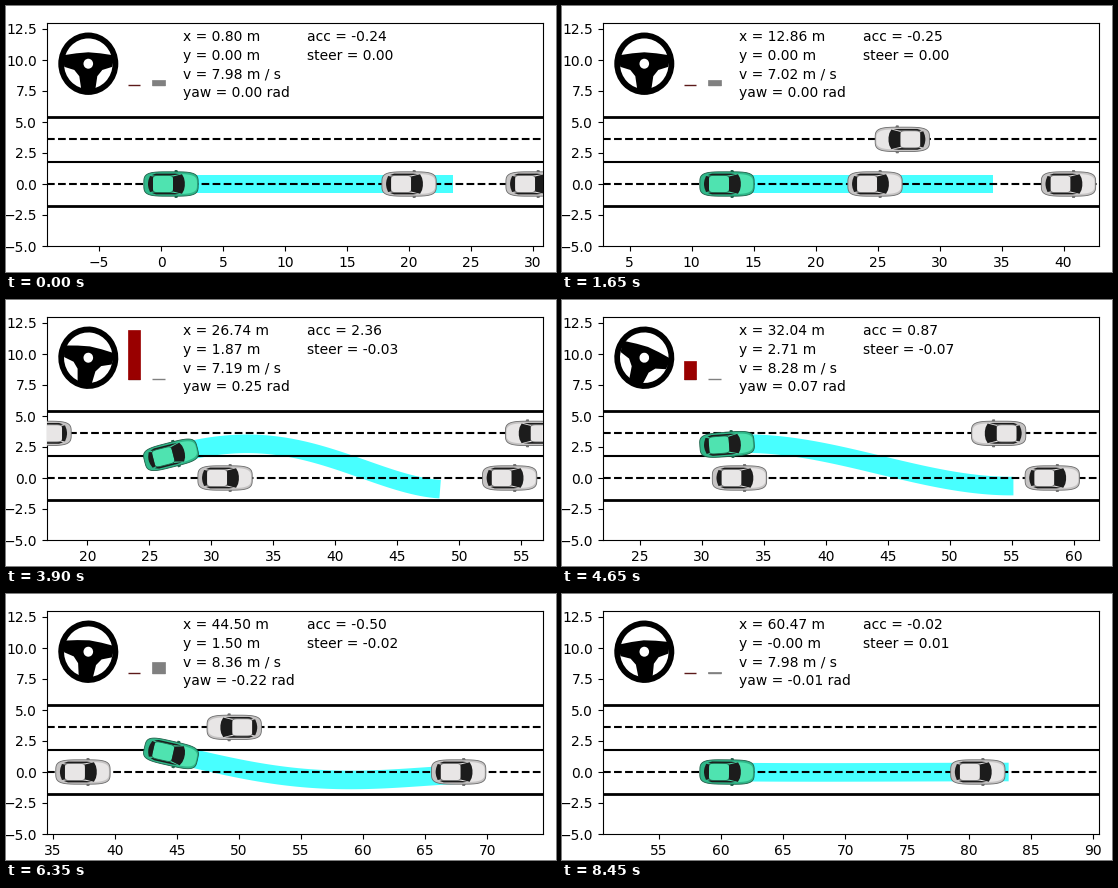
Recreate the animation shown at these times as a matplotlib script. Size 550 by 266 pixels, loop 9450 ms.

```python
import numpy as np
import matplotlib.pyplot as plt
from matplotlib.animation import FuncAnimation
from matplotlib.patches import Circle, Polygon, Rectangle
from matplotlib.ticker import MultipleLocator
from matplotlib.transforms import Affine2D

W, H, DPI = 550, 266, 100
SCALE = 12.4          # pixels per metre
INTERVAL, LOOP = 50, 9450
DT = 0.1              # simulated seconds per step

# A step takes 100 ms; playback hangs for 50 ms more after each run of steps
RUNS = [3, 5, 8, 9, 8, 6, 5, 6, 4, 4, 14, 4, 3]
STEP_TIMES = 50 + 100 * np.arange(sum(RUNS)) + 50 * np.repeat(np.arange(len(RUNS)), RUNS)

# Key states of the overtaking: step, x, y, v, acc, yaw, steer
KEYS = np.array([
    (0, 0.80, 0, 7.976, -0.24, 0, 0),
    (16, 12.86, 0, 7.02, -0.25, 0, 0),
    (27, 20.21, 0.51, 6.54, -0.002, 0.12, 0.05),
    (37, 26.74, 1.87, 7.19, 2.36, 0.25, -0.03),
    (51, 37.90, 2.66, 8.58, 0.10, -0.09, -0.11),
    (68, 51.67, 0.18, 8.02, -0.05, -0.09, 0.08),
    (79, 60.47, -0.001, 7.98, -0.02, -0.01, 0.01)]).T
# Far end of the planned path: step, y, slope, bulge of the middle
PLAN = np.array([
    (16, 0, 0, 0),
    (27, 2.1, -0.15, 0.77),
    (37, -0.9, -0.06, 0.83),
    (51, -0.4, 0.08, -0.79),
    (68, 0, 0, 0)]).T
# Traffic: start x, lane y, speed
TRAFFIC = [(20, 0, 3.0), (30, 0, 6.5), (35, 3.6, -5.0), (67, 3.6, -3.0)]


def cubic(u, h, a, b, p, q):
    """Cubic over a span h from a to b with end slopes p, q; returns value and slope."""
    p, q = p * h, q * h
    c2, c3 = 3 * (b - a) - 2 * p - q, 2 * (a - b) + p + q
    return a + u * (p + u * (c2 + u * c3)), (p + u * (2 * c2 + 3 * u * c3)) / h


def ego_state(step):
    k, xs, ys, vs, accs, yaws, steers = KEYS
    i = min(np.searchsorted(k, step, "right") - 1, len(k) - 2)
    h = k[i + 1] - k[i]
    u = (step - k[i]) / h

    def ease(values, rates):
        return cubic(u, h, *values[i:i + 2], *(rates[i:i + 2] * DT))

    x, dx = ease(xs, vs * np.cos(yaws))
    y, dy = ease(ys, vs * np.sin(yaws))
    v, dv = ease(vs, accs)
    return x, y, v, dv / DT, np.arctan2(dy, dx), np.interp(step, k, steers)


def plan_outline(step, x, y, v, yaw, half=0.75):
    end, slope, bulge = [np.interp(step, PLAN[0], row) for row in PLAN[1:]]
    length = 12.5 + 1.28 * v
    u = np.linspace(0, 1, 60)
    mid, _ = cubic(u, length, y, end, np.tan(yaw), slope)
    mid += bulge * 16 * (u * (1 - u)) ** 2
    angle = np.arctan(np.gradient(mid, u * length))
    side = half * np.column_stack([-np.sin(angle), np.cos(angle)])
    centre = np.column_stack([x + u * length, mid])
    return np.vstack([centre + side, (centre - side)[::-1]])


def rounded(cx, rx, ry, power=0.45):
    a = np.linspace(0, 2 * np.pi, 60, endpoint=False)
    c, s = np.cos(a), np.sin(a)
    return np.column_stack([cx + rx * np.sign(c) * abs(c) ** power,
                            ry * np.sign(s) * abs(s) ** power])


def mirrored(points):
    return points + [(x, -y) for x, y in reversed(points)]


class Car:
    """Top view of a car, drawn in pixels around its centre."""

    def __init__(self, ax, body, roof, edge, zorder):
        glass = "#1c1c1c"
        shapes = [([(4, 11 * s), (7, 11 * s), (6, 13.5 * s), (4, 13.5 * s)], edge, edge)
                  for s in (1, -1)]
        shapes.append((rounded(0, 27.2, 12.2, 0.5), body, edge))
        shapes.append((rounded(2, 24, 10, 0.55), roof, "none"))
        for s in (1, -1):
            shapes.append(([(-19, 9 * s), (-15, 10.4 * s), (4, 10.4 * s), (9, 9.8 * s),
                            (2, 8.7 * s), (-16, 8.2 * s)], glass, "none"))
        shapes.append((rounded(-8, 10.5, 8.6, 0.35), roof, edge))
        shapes.append((mirrored([(2, 7.5), (11, 9.8), (13, 6), (13.8, 2)]), glass, "none"))
        shapes.append((mirrored([(-18, 7.5), (-21, 8), (-22.5, 4), (-23, 1)]), glass, "none"))
        self.ax = ax
        self.parts = [ax.add_patch(Polygon(p, fc=fc, ec=ec, lw=0.6, zorder=zorder))
                      for p, fc, ec in shapes]

    def place(self, x, y, angle):
        pose = Affine2D().scale(1 / SCALE).rotate(angle).translate(x, y)
        for part in self.parts:
            part.set_transform(pose + self.ax.transData)


fig = plt.figure(figsize=(W / DPI, H / DPI), dpi=DPI, facecolor="white")
box = [41 / W, 26 / H, 496 / W, 223.2 / H]
ax = fig.add_axes(box)
ax.set_ylim(-5, 13)
ax.xaxis.set_major_locator(MultipleLocator(5))
ax.yaxis.set_major_locator(MultipleLocator(2.5))

# The dashboard keeps its place relative to the ego car
hud = fig.add_axes(box)
hud.set(xlim=(-10, 30), ylim=(-5, 13))
hud.axis("off")

for lane_y, width, style in ((5.4, 2, "-"), (3.6, 1.5, "--"), (1.8, 1.5, "-"),
                             (0, 1.5, "--"), (-1.8, 2, "-")):
    ax.axhline(lane_y, color="black", lw=width, ls=style, zorder=2)

plan = ax.add_patch(Polygon([(0, 0), (1, 0), (1, 1)], fc="#48ffff", ec="none", zorder=1))
traffic = [Car(ax, "#c6c4c4", "#e8e6e6", "#6a6a6a", 3) for _ in TRAFFIC]
ego = Car(ax, "#30b88a", "#4fe3b0", "#1d5f48", 4)

spokes = [(0, 11), (12, 10), (26, 8), (24, -3), (14, -6), (9, -12), (7, -25)]
spokes += [(-x, y) for x, y in reversed(spokes)]
wheel = [hud.add_patch(p) for p in (
    Circle((0, 0), 30, fc="black", zorder=1), Circle((0, 0), 24.3, fc="white", zorder=2),
    Polygon(spokes, fc="black", zorder=3), Circle((0, 0), 4.8, fc="white", zorder=4))]


def pedal(x, color, idle):
    hud.plot([x, x + 1], [8, 8], color=idle, lw=1, solid_capstyle="butt")
    return hud.add_patch(Rectangle((x, 8), 1, 0, fc=color, ec=color, lw=0.5, zorder=3))


def press(bar, amount):
    bar.set_height(max(amount, 0) * 5 / 3)
    bar.set_visible(amount > 0)


gas = pedal(-3.5, "#990000", "#5c1a1a")
brake = pedal(-1.5, "#808080", "#808080")
labels = [hud.text(1 + 10 * (i // 4), 11.5 - 1.5 * (i % 4), "") for i in range(6)]


def update(frame):
    step = int(np.sum(STEP_TIMES <= frame * INTERVAL))
    x, y, v, acc, yaw, steer = ego_state(step)
    ax.set_xlim(x - 10, x + 30)

    ego.place(x, y, yaw)
    # Traffic loses one step while the ego car passes
    clock = DT * (step - np.interp(step, [37, 51], [0, 1]))
    for car, (start, lane_y, speed) in zip(traffic, TRAFFIC):
        car.place(start + speed * clock, lane_y, 0 if speed > 0 else np.pi)
    plan.set_xy(plan_outline(step, x, y, v, yaw))

    turn = Affine2D().rotate(5 * steer).scale(1 / SCALE, 1.04 / SCALE).translate(-6.67, 9.7)
    for part in wheel:
        part.set_transform(turn + hud.transData)
    press(gas, acc)
    press(brake, -acc)

    texts = (f"x = {x:.2f} m", f"y = {y:.2f} m", f"v = {v:.2f} m / s",
             f"yaw = {yaw:.2f} rad", f"acc = {acc:.2f}", f"steer = {steer:.2f}")
    for label, text in zip(labels, texts):
        label.set_text(text)
    return []


anim = FuncAnimation(fig, update, frames=LOOP // INTERVAL, interval=INTERVAL,
                     repeat=True, repeat_delay=0, blit=False)
plt.show()
```
